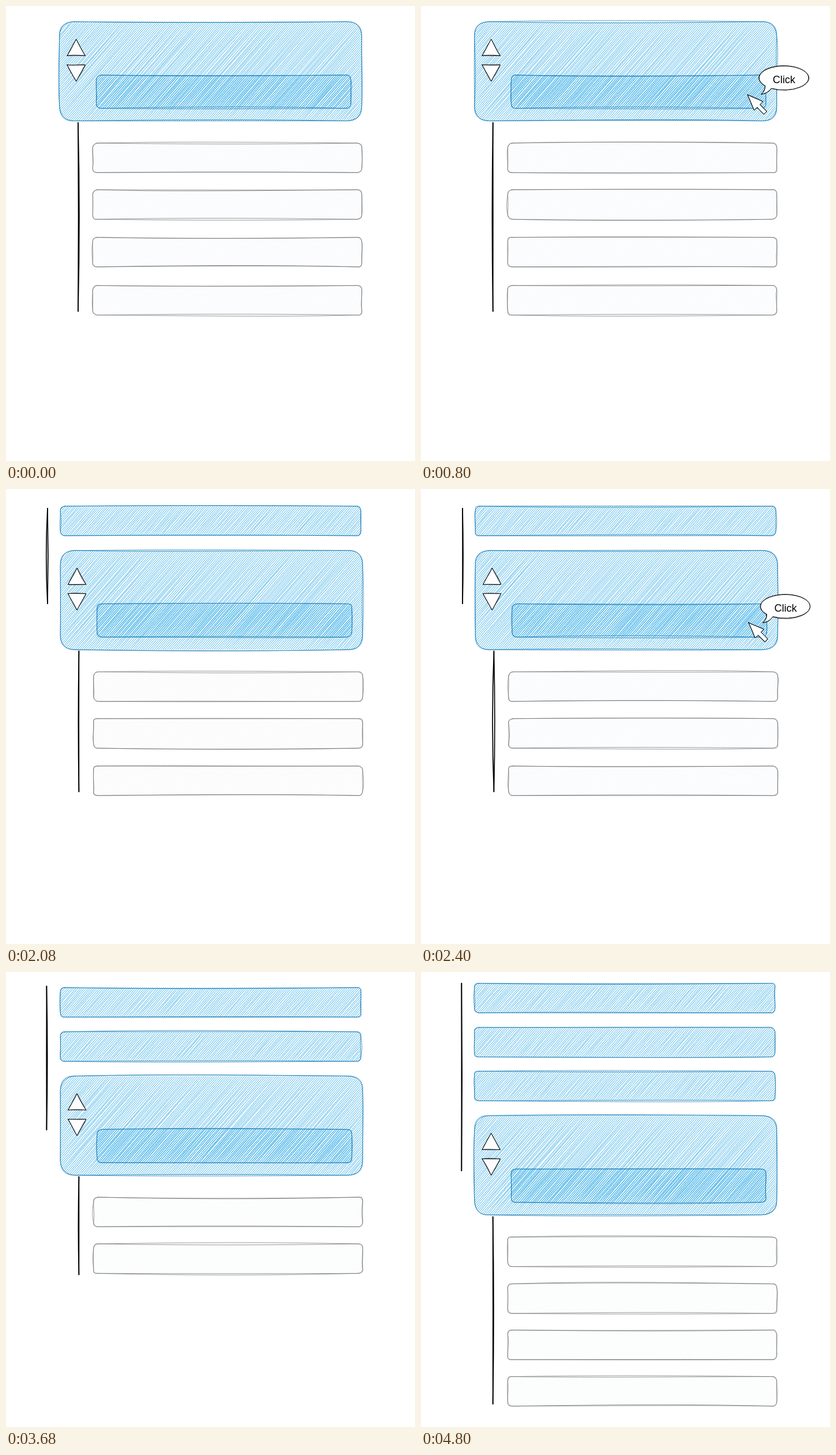
These frames come from a looping animation (709x790 px, 5.6 s). An HTML page with a canvas:

```html
<!DOCTYPE html>
<html lang="en">
<head>
<meta charset="utf-8">
<title>Reorder sketch</title>
<style>
  html, body { margin: 0; width: 100%; height: 100%; overflow: hidden; background: #fff; }
  canvas { display: block; }
</style>
</head>
<body>
<canvas id="stage" width="709" height="790"></canvas>
<script>
const ctx = document.getElementById('stage').getContext('2d');
const STEP = 800;
const BLUE = '#1ba1e2', BLUE_EDGE = '#006eaf', GREY_EDGE = '#666', INK = '#000';
const HATCH_WOBBLE = 1.7, EDGE_WOBBLE = 2.8, SHAPE_WOBBLE = 1.5;
const SLOPE = 1 / Math.tan(49 * Math.PI / 180), GAP = 3.7;

// line: [x, top, bottom, bow of each of its two strokes]
const scenes = [
  { card: [92.7, 27.2], tasks: [238, 319, 401.7, 485.3], tint: '#fcfdff',
    lines: [[125, 202.5, 530, 0.6, 1.9]] },
  { card: [92.7, 27.2], tasks: [238, 319, 401.7, 485.3], tint: '#fcfdff',
    lines: [[124.7, 202.5, 530, -1.3, 0.1]], cursor: [566, 154], bubble: [629, 125] },
  { card: [94.2, 106.7], done: [29.8], tasks: [317.5, 398.7, 481], tint: '#fdfdfd',
    lines: [[72, 33.5, 199, -2.2, 0.9], [126.4, 281.5, 525.5, -1, -0.2]] },
  { card: [94.2, 106.7], done: [29.8], tasks: [317.5, 398.7, 481], tint: '#fcfdff',
    lines: [[72, 33.5, 199, 0.1, 1], [126.4, 281.5, 525.5, -2.4, 1.4]],
    cursor: [567.5, 231.5], bubble: [631.7, 204] },
  { card: [94.2, 180.6], done: [27, 103.8], tasks: [391, 472], tint: '#fdfefe',
    lines: [[70.4, 24.5, 274, -0.2, 1.3], [126.4, 355.5, 525.5, -1, 0]] },
  { card: [94.2, 181.2], done: [27.5, 104.4], tasks: [391.7, 472.7], tint: '#fafafa',
    lines: [[70.4, 25.5, 275, 0.2, 1.2], [126.4, 356, 526.5, -3, 2.4]],
    cursor: [498.7, 307], bubble: [563.2, 273] },
  { card: [92.7, 249.4], done: [19.6, 96.2, 172.3], tasks: [460.2, 541.5, 621.7, 702.5], tint: '#fdfefe',
    lines: [[70.3, 19.5, 345, 0, 0.8], [124.6, 425, 750, 0.2, 1.3]] }
];

let seed = 1;
function random() {
  seed = (seed + 0x6d2b79f5) | 0;
  let t = Math.imul(seed ^ (seed >>> 15), 1 | seed);
  t = (t + Math.imul(t ^ (t >>> 7), 61 | t)) ^ t;
  return ((t ^ (t >>> 14)) >>> 0) / 4294967296;
}
const spread = amount => (random() * 2 - 1) * amount;

function pen(color, width) {
  ctx.strokeStyle = color;
  ctx.lineWidth = width;
  ctx.lineCap = ctx.lineJoin = 'round';
}

// Adds a hand-drawn segment with exact ends to the current path.
function roughLine(x1, y1, x2, y2, pass, wobble) {
  const dx = x2 - x1, dy = y2 - y1, length = Math.hypot(dx, dy);
  const gain = Math.max(0.4, Math.min(1, 1.233 - length / 600));
  const offset = Math.min(wobble, length / 10);
  const bowX = spread(offset * dy / 200 * gain), bowY = spread(offset * dx / 200 * gain);
  const jitter = offset * gain * (pass ? 0.5 : 1);
  const at = 0.2 + random() * 0.2;
  ctx.bezierCurveTo(
    x1 + dx * at + bowX + spread(jitter), y1 + dy * at + bowY + spread(jitter),
    x1 + dx * 2 * at + bowX + spread(jitter), y1 + dy * 2 * at + bowY + spread(jitter),
    x2, y2);
}

function roughPolygon(points) {
  for (let pass = 0; pass < 2; pass++) {
    ctx.beginPath();
    ctx.moveTo(...points[0]);
    points.forEach((p, i) => roughLine(...p, ...points[(i + 1) % points.length], pass, SHAPE_WOBBLE));
    ctx.stroke();
  }
}

function fillPolygon(points, color) {
  ctx.beginPath();
  points.forEach(p => ctx.lineTo(...p));
  ctx.fillStyle = color;
  ctx.fill();
}

function hatch(x, y, w, h, color) {
  pen(color, 0.52);
  ctx.beginPath();
  for (let foot = -h * SLOPE + GAP / 2; foot < w; foot += GAP) {
    const low = Math.max(0, -foot / SLOPE), high = Math.min(h, (w - foot) / SLOPE);
    if (high - low < 1) continue;
    for (let pass = 0; pass < 2; pass++) {
      const x1 = x + foot + low * SLOPE, y1 = y + h - low;
      ctx.moveTo(x1, y1);
      roughLine(x1, y1, x + foot + high * SLOPE, y + h - high, pass, HATCH_WOBBLE);
    }
  }
  ctx.stroke();
}

function roughBox(x, y, w, h, fill, edge, solid) {
  const r = Math.min(w, h) * 0.15, right = x + w, bottom = y + h;
  ctx.save();
  ctx.beginPath();
  ctx.roundRect(x, y, w, h, r * 0.9);
  if (solid) {
    ctx.fillStyle = solid;
    ctx.fill();
  }
  ctx.clip();
  hatch(x, y, w, h, fill);
  ctx.restore();

  const sides = [
    [x + r, y, right - r, y, right, y, right, y + r],
    [right, y + r, right, bottom - r, right, bottom, right - r, bottom],
    [right - r, bottom, x + r, bottom, x, bottom, x, bottom - r],
    [x, bottom - r, x, y + r, x, y, x + r, y]
  ];
  pen(edge, 0.68);
  for (let pass = 0; pass < 2; pass++) {
    ctx.beginPath();
    ctx.moveTo(x + r, y);
    for (const [x1, y1, x2, y2, cx, cy, ex, ey] of sides) {
      roughLine(x1, y1, x2, y2, pass, EDGE_WOBBLE);
      ctx.quadraticCurveTo(cx + spread(2), cy + spread(2), ex, ey);
    }
    ctx.stroke();
  }
}

function triangle(x, base, tip) {
  const points = [[x, base], [x + 31.3, base], [x + 15.6, tip]];
  fillPolygon(points, '#fdfdff');
  pen(INK, 0.85);
  roughPolygon(points);
}

function card(x, y) {
  roughBox(x, y, 524, 172.3, BLUE, BLUE_EDGE);
  roughBox(x + 63.7, y + 92.7, 441.5, 57.8, BLUE, BLUE_EDGE);
  triangle(x + 13.3, y + 59, y + 30.5);
  triangle(x + 13.3, y + 75, y + 103.5);
}

function rail([x, top, bottom, ...bows]) {
  const third = (bottom - top) / 3;
  pen(INK, 1.7);
  for (const bow of bows) {
    ctx.beginPath();
    ctx.moveTo(x, top);
    ctx.bezierCurveTo(x + bow * 1.33, top + third, x + bow * 1.33, bottom - third, x, bottom);
    ctx.stroke();
  }
}

function cursor(x, y) {
  const shape = [[0, 0], [26.8, 12], [21.8, 17], [33.5, 29], [28.5, 34], [17, 22], [11.5, 27]];
  const points = shape.map(([dx, dy]) => [x + dx, y + dy]);
  fillPolygon(points, '#fff');
  pen(INK, 0.85);
  roughPolygon(points);
}

function bubble(x, y) {
  const degree = Math.PI / 180;
  for (let pass = 0; pass < 2; pass++) {
    ctx.beginPath();
    ctx.ellipse(x + spread(0.4), y + spread(0.5), 43 + spread(0.4), 20.7 + spread(0.6),
      0, 139 * degree, 480 * degree);
    ctx.quadraticCurveTo(x - 28 + spread(1), y + 27 + spread(1), x - 39.2, y + 28.3);
    ctx.quadraticCurveTo(x - 32 + spread(1), y + 23 + spread(1), x - 32.4, y + 13.6);
    if (!pass) {
      ctx.fillStyle = '#fff';
      ctx.fill();
    }
    pen(INK, 0.85);
    ctx.stroke();
  }
  ctx.fillStyle = INK;
  ctx.font = '18px "Liberation Sans", Arial, sans-serif';
  ctx.textAlign = 'center';
  ctx.fillText('Click', x + 0.3, y + 9.2);
}

function drawScene(index) {
  const scene = scenes[index], [x, y] = scene.card;
  seed = 7919 * (index + 1);
  ctx.fillStyle = '#fff';
  ctx.fillRect(0, 0, 709, 790);
  for (const top of scene.done || []) roughBox(x, top, 521, 51.3, BLUE, BLUE_EDGE);
  card(x, y);
  for (const top of scene.tasks) roughBox(x + 57.6, top, 466.5, 51.3, '#f7f8fa', GREY_EDGE, scene.tint);
  scene.lines.forEach(rail);
  if (scene.cursor) cursor(...scene.cursor);
  if (scene.bubble) bubble(...scene.bubble);
}

let shown = -1;
function tick() {
  const index = Math.floor(performance.now() / STEP) % scenes.length;
  if (index !== shown) drawScene(shown = index);
  requestAnimationFrame(tick);
}
tick();
</script>
</body>
</html>
```
